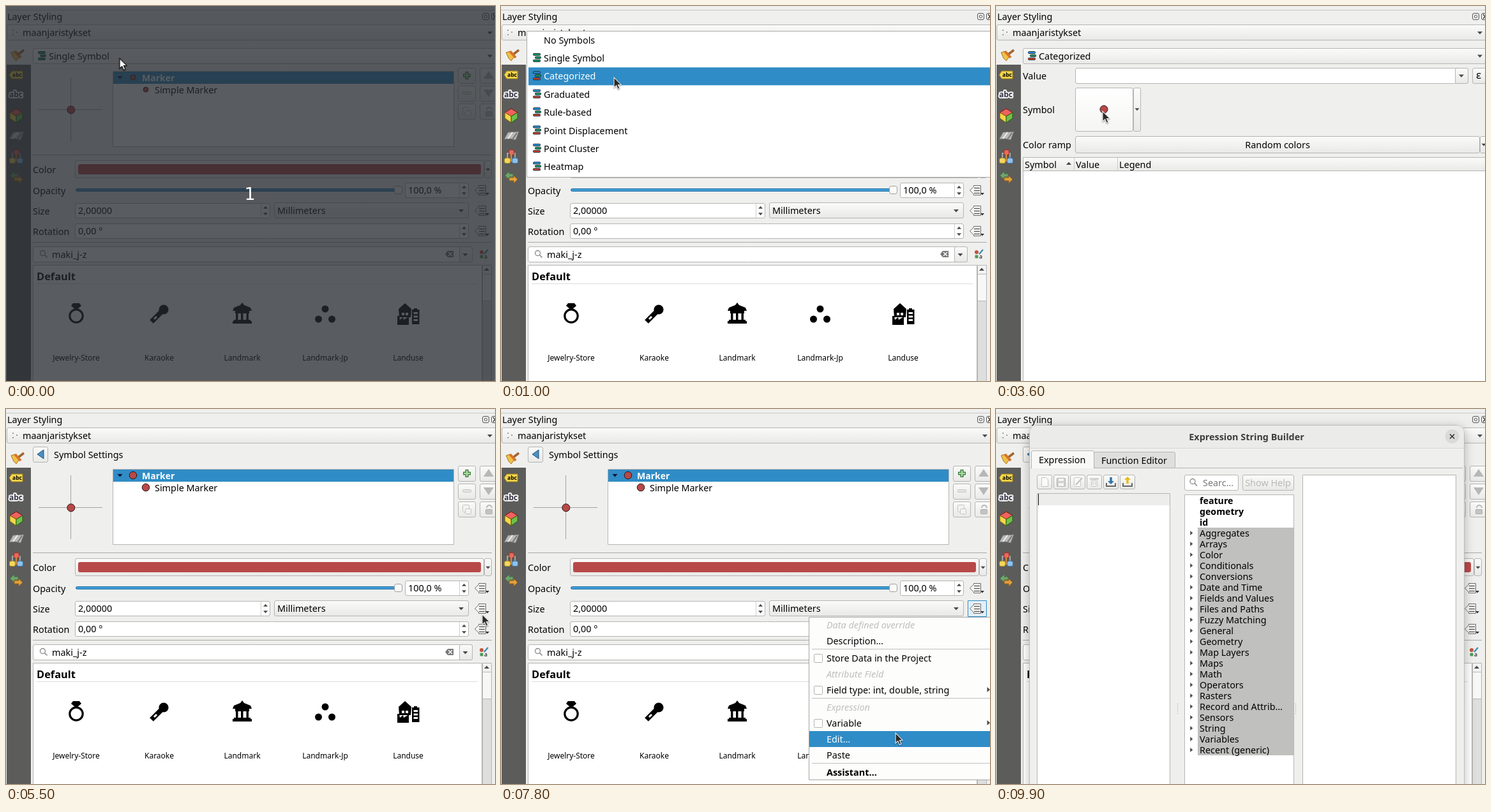
An HTML page with a canvas for the animation above (10 s loop, 766 by 588 pixels).

```html
<!DOCTYPE html>
<html lang="en">
<head>
<meta charset="utf-8">
<title>Layer Styling</title>
<style>
html, body { margin: 0; width: 100%; height: 100%; overflow: hidden; background: #efefee }
canvas { display: block }
</style>
</head>
<body>
<canvas id="stage" width="766" height="588"></canvas>
<script>
const c = document.getElementById('stage').getContext('2d');
const LOOP = 10000;
const BLUE = '#308cc6', RED = '#b84848', EDGE = '#b5b5b4', BG = '#efefee', INK = '#4a4a4a';
const SANS = '"Noto Sans", "Open Sans", sans-serif';

// ---- drawing helpers ----
function rect(x, y, w, h, fill) { c.fillStyle = fill; c.fillRect(x, y, w, h); }

function box(x, y, w, h, fill = '#fff', stroke = EDGE, r = 2.5) {
  c.beginPath();
  c.roundRect(x + .5, y + .5, w, h, r);
  c.fillStyle = fill; c.fill();
  if (stroke) { c.strokeStyle = stroke; c.lineWidth = 1; c.stroke(); }
}

function button(x, y, w, h, lit = false, r = 2.5) {
  const g = c.createLinearGradient(0, y, 0, y + h);
  g.addColorStop(0, lit ? '#fff' : '#fbfbfa');
  g.addColorStop(1, lit ? '#f5f5f4' : '#e9e9e8');
  box(x, y, w, h, g, EDGE, r);
}

function poly(pts, fill, stroke, width = 1, close = true) {
  c.beginPath();
  for (let i = 0; i < pts.length; i += 2) c.lineTo(pts[i], pts[i + 1]);
  if (close) c.closePath();
  if (fill) { c.fillStyle = fill; c.fill(); }
  if (stroke) { c.strokeStyle = stroke; c.lineWidth = width; c.stroke(); }
}
const line = (pts, color, width = 1) => poly(pts, null, color, width, false);

function circle(x, y, r, fill, stroke, width = 1) {
  c.beginPath();
  c.arc(x, y, r, 0, 7);
  if (fill) { c.fillStyle = fill; c.fill(); }
  if (stroke) { c.strokeStyle = stroke; c.lineWidth = width; c.stroke(); }
}

function text(s, x, y, { size = 14.4, style = '', color = '#000', align = 'left', font = SANS } = {}) {
  c.font = `${style} ${size}px ${font}`;
  c.textAlign = align;
  c.fillStyle = color;
  c.fillText(s, x, y);
}

const down = (x, y, s = 4, color = INK) => poly([x - s, y - s / 2, x + s, y - s / 2, x, y + s / 2 + .5], color);
const up = (x, y, s = 4, color = INK) => poly([x - s, y + s / 2, x + s, y + s / 2, x, y - s / 2 - .5], color);
const right = (x, y, s = 4, color = INK) => poly([x - s / 2, y - s, x - s / 2, y + s, x + s / 2 + .5, y], color);
const marker = (x, y, r) => circle(x, y, r, RED, '#2a1515');

function magnifier(x, y) {
  circle(x - 1, y - 1, 4, null, '#888', 1.3);
  line([x + 2, y + 2, x + 6, y + 6], '#888', 1.6);
}

function bars(x, y, colors) {
  colors.forEach((color, i) => box(x + (i === 1 ? 3 : 0), y + i * 5, i === 1 ? 9 : 11, 3, color, '#123', 1));
}

// ---- window frame and sidebar ----
function frame() {
  rect(0, 0, 766, 588, BG);
  rect(0, 6, 766, 1, '#c9c9c8');
  text('Layer Styling', 2, 22);
  box(746, 11, 10, 10, BG, '#555');
  box(749, 14, 4, 4, BG, '#555', 1);
  box(760, 11, 10, 10, BG, '#555');
  line([763, 13, 769, 20], '#333', 1.3);
  line([763, 20, 769, 13], '#333', 1.3);
  button(1, 29, 772, 24);
  for (const [x, y] of [[11, 38], [17, 41], [11, 45]]) circle(x, y, 1.1, '#888');
  text('maanjaristykset', 26, 47);
  down(758, 42);
  sidebar();
}

function sidebar() {
  rect(1, 92, 38, 496, '#5c5c5b');
  line([19, 76, 28, 69], '#a3642d', 3.5);
  poly([8, 73, 14, 71, 21, 79, 16, 86, 12, 82], '#f0c04a', '#a87412');
  line([14, 71, 23, 81], '#d5732b', 4);

  poly([5, 108, 9, 102, 26, 102, 26, 114, 9, 114], '#f5d64d', '#a88a18');
  text('abc', 10, 111, { size: 8.5, style: 'bold' });
  c.lineJoin = 'round';
  c.font = 'bold 12px ' + SANS;
  c.textAlign = 'left';
  c.strokeStyle = '#f4f4f4'; c.lineWidth = 4;
  c.strokeText('abc', 5, 143);
  text('abc', 5, 143, { size: 12, style: 'bold', color: '#334' });
  c.lineJoin = 'miter';

  poly([16, 161, 26, 167, 16, 173, 6, 167], '#f0625d', '#7a1512');
  poly([6, 167, 16, 173, 16, 183, 6, 176], '#f4d64a', '#75640c');
  poly([26, 167, 16, 173, 16, 183, 26, 176], '#6fc04a', '#2a5c12');

  poly([5, 209, 11, 198, 28, 197, 23, 210, 14, 208], '#b9b9b8', '#777');
  line([11, 208, 18, 198], '#eee', 2);
  line([18, 209, 25, 199], '#777', 2);

  line([10, 240, 10, 231, 22, 231, 22, 240], '#bbb', 1.5);
  box(12, 225, 8, 8, '#e26a5d', '#a82c22');
  box(5, 238, 9, 8, '#f3d760', '#b3921c');
  box(17, 238, 9, 8, '#8fc1ea', '#3f7cb0');
  line([16, 232, 16, 244], '#d98a3a', 2);

  poly([6, 266, 13, 259, 13, 263, 19, 263, 19, 268, 13, 268, 13, 272], '#6fa56c', '#456f45');
  poly([26, 272, 20, 266, 20, 269, 13, 269, 13, 274, 20, 274, 20, 278], '#e2a03e', '#96601a');
}

function rendererCombo(label, colors, lit) {
  button(42, 66, 730, 24, lit);
  bars(50, 71, colors);
  text(label, 67, 84);
  down(758, 78.5);
}
const GREEN = '#1ba35c';
const GREENS = [GREEN, GREEN, GREEN], MIXED = ['#2d9be0', GREEN, '#d8452f'];

// ---- symbol panel ----
function overrideIcon(y) {
  poly([734.5, y, 740.5, y - 6, 740.5, y - 7.5, 751.5, y - 7.5, 751.5, y + 7.5, 740.5, y + 7.5, 740.5, y + 6], '#f5f5f4', '#6a6a6a');
  for (const d of [-3.5, .5, 4.5]) line([741, y + d, 750, y + d], '#555', 1.3);
  down(754, y + 5.5, 3, '#333');
}

function spin(x, y, w, value) {
  box(x, y, w, 23);
  line([x + w - 13.5, y + 1, x + w - 13.5, y + 23], '#cfcfce');
  text(value, x + 5, y + 17);
  up(x + w - 6.5, y + 7, 3.5);
  down(x + w - 6.5, y + 17, 3.5);
}

function layerButtons() {
  for (let row = 0; row < 3; row++)
    for (const x of [708, 742]) button(x, 97 + row * 28, 27, 24);
  line([722, 103, 722, 115], '#2b6e2b', 5);
  line([716, 109, 728, 109], '#2b6e2b', 5);
  line([722, 104, 722, 114], '#a9dba0', 2.6);
  line([717, 109, 727, 109], '#a9dba0', 2.6);
  box(715, 134, 13, 4, '#e5e5e4', '#c4c4c3', 1);
  box(715, 158, 10, 11, '#f3f3f2', '#c4c4c3', 1);
  box(719, 164, 9, 8, '#f3f3f2', '#c4c4c3', 1);
  poly([756, 102, 764, 114, 748, 114], '#b7b7b6');
  poly([756, 143, 764, 131, 748, 131], '#b7b7b6');
  box(751, 165, 10, 7, '#c3c3c2', '#acacab', 1);
  c.beginPath(); c.arc(757, 163, 4, Math.PI, 0);
  c.strokeStyle = '#b7b7b6'; c.lineWidth = 2; c.stroke();
}

function symbolIcons() {
  const K = '#000', W = '#fff';
  poly([105, 466, 115, 466, 118, 470, 110, 477, 102, 470], K);
  circle(110, 486, 10.2, null, K, 3.2);

  circle(247, 476, 7.6, K);
  line([243, 480, 228, 495], K, 8);
  line([236, 487, 232, 491], W, 3);

  poly([370, 465, 373, 469, 383, 473, 385, 478, 355, 478, 357, 473, 367, 469], K);
  rect(359, 478, 22, 4, K);
  for (const x of [360, 368, 376.5]) rect(x, 481, 3.5, 13, K);
  rect(357, 492, 26, 2, K);
  rect(355, 494, 30, 4, K);

  for (const [x, y] of [[500, 475], [489.5, 491], [510.5, 491]]) circle(x, y, 5.5, K);

  poly([625, 466, 635, 475, 634, 488, 616, 488, 615, 475], K);
  rect(620, 481, 4, 4, W);
  rect(626, 481, 4, 4, W);
  poly([613, 500, 613, 486, 616, 486, 617, 492, 622, 488, 623, 492, 631, 487, 631, 500], K);
  rect(636, 476, 11.5, 23, K);
  rect(639, 474, 5, 3, K);
  for (const y of [480, 485.5, 491]) rect(638.5, y, 6.5, 3, W);
}

function symbolPanel(dy, r, pressed) {
  c.save();
  c.translate(0, dy);
  line([51, 162.5, 151, 162.5], '#a3a3a2');
  line([101.5, 112, 101.5, 212], '#a3a3a2');
  marker(101.8, 162.8, 6);

  box(167, 102, 534, 118, '#fff', EDGE, 0);
  rect(168, 103, 533, 19, BLUE);
  down(178.5, 112, 4, '#113');
  marker(199, 112, r);
  text('Marker', 213, 118, { size: 14, style: 'bold', color: '#fff' });
  marker(219, 131, r);
  text('Simple Marker', 233, 137);
  layerButtons();
  rect(42, 233, 719, 1, '#a9a9a8');

  text('Color', 42, 262);
  button(108, 242, 640, 27);
  box(112.5, 247.5, 631, 16, RED, null, 3);
  button(749, 242, 11, 27);
  down(755, 256.5, 3.5);

  text('Opacity', 42, 295);
  box(109, 286, 502, 4, '#3f9cd6', '#2572a4', 2);
  box(608, 282, 12, 12, '#fbfbfa', '#9a9a99', 3);
  spin(625, 277, 99, '100,0 %');
  overrideIcon(289);

  text('Size', 42, 327);
  spin(108, 309, 305, '2,00000');
  button(420, 308, 304, 24);
  text('Millimeters', 425, 326);
  down(713, 321);
  if (pressed) box(731, 308, 29, 25, '#e3eef6', BLUE, 0);
  overrideIcon(321);

  text('Rotation', 42, 359);
  spin(108, 341, 616, '0,00 °');
  overrideIcon(353);
  rect(42, 370, 719, 1, '#a9a9a8');

  box(42, 377, 688, 24);
  magnifier(58.5, 388.5);
  text('maki_j-z', 72, 395);
  poly([688, 389, 692, 384, 701, 384, 701, 394, 692, 394], '#777');
  line([693, 386, 699, 392], '#fff', 1.4);
  line([693, 392, 699, 386], '#fff', 1.4);
  button(710, 377, 20, 24);
  down(719.5, 390);
  circle(745, 386, 3, '#c0563f');
  line([749, 389, 755, 382], '#3f8fb5', 2.4);
  box(742, 390, 5, 5, '#4d9b58', null, 1);
  text('a', 749, 396, { size: 9 });

  box(42, 406, 703, 210, '#fff', EDGE, 0);
  box(746, 406, 14, 210, '#dededd', EDGE, 0);
  box(746, 406, 14, 14, '#f3f3f2', EDGE, 0);
  up(753, 413);
  box(746, 420, 14, 42, '#f7f7f6', EDGE, 0);
  text('Default', 48, 430, { size: 16.4, style: 'bold' });
  rect(48, 435, 691, 1, '#dcdcdb');
  symbolIcons();
  ['Jewelry-Store', 'Karaoke', 'Landmark', 'Landmark-Jp', 'Landuse'].forEach((name, i) =>
    text(name, 110 + i * 130, 556, { size: 12, align: 'center' }));
  c.restore();
}

function settingsHeader() {
  button(42, 59, 23, 24);
  poly([49, 71, 59, 64, 59, 78], '#4a90c4', '#1f527c');
  text('Symbol Settings', 75, 77);
}

// ---- renderer list ----
function rendererPopup(selected) {
  const names = ['No Symbols', 'Single Symbol', 'Categorized', 'Graduated', 'Rule-based',
    'Point Displacement', 'Point Cluster', 'Heatmap'];
  box(40, 39, 740, 229, '#fff', '#a9a9a8', 0);
  names.forEach((name, i) => {
    const y = 39.5 + i * 28.4;
    if (i === selected) rect(43, y, 723, 28, BLUE);
    if (i) bars(50, y + 6, i === 1 ? GREENS : MIXED);
    text(name, 67, y + 19, { color: i === selected ? '#fff' : '#000' });
  });
}

// ---- categorized panel ----
function categorizedPanel(t) {
  text('Value', 42, 115);
  box(124, 97, 615, 24);
  button(719, 97, 20, 24);
  down(729, 109.5);
  button(746, 97, 30, 24);
  text('ε', 752, 114, { size: 17 });

  text('Symbol', 42, 168);
  if (t >= 3400 && t < 3600) box(124, 128, 90, 68, '#d9d9d8');
  else button(124, 128, 90, 68, t >= 2600);
  button(215, 128, 11, 68);
  down(221, 162, 3.5);
  marker(169, 162, 6);

  text('Color ramp', 42, 223);
  button(124, 204, 633, 26);
  text('Random colors', 441, 223, { align: 'center' });
  button(758, 204, 20, 26);
  down(764, 217.5, 3.5);

  box(42, 237, 740, 400, '#fff', EDGE, 0);
  button(42, 237, 740, 21, false, 0);
  for (const x of [122, 190]) rect(x, 238, 1, 21, '#c9c9c8');
  text('Symbol', 45, 254);
  up(114, 247);
  text('Value', 125, 254);
  text('Legend', 193, 254);
}

// ---- override menu ----
const MENU = [
  ['Data defined override', 339, 'head'], ['Description…', 364], ['Store Data in the Project', 391, 'check'],
  ['Attribute Field', 416, 'head'], ['Field type: int, double, string', 441, 'check sub'],
  ['Expression', 468, 'head'], ['Variable', 493, 'check sub'], ['Edit…', 518], ['Paste', 543], ['Assistant…', 570, 'bold']
];

function overrideMenu(pointerY) {
  box(482, 326, 300, 255, '#fdfdfc', '#a5a5a4', 0);
  for (const y of [376, 453, 555]) rect(487, y, 279, 1, '#c0c0bf');
  for (const [label, y, kind = ''] of MENU) {
    const head = kind === 'head', hot = !head && Math.abs(pointerY - y) <= 12.5;
    if (hot) rect(483, y - 13, 283, 25, BLUE);
    if (kind.includes('check')) box(490, y - 7, 13, 13, '#fff', '#b2b2b1', 1);
    if (kind.includes('sub')) right(763.5, y - 1, 4);
    text(label, 510, y + 5, {
      style: head ? 'italic' : kind === 'bold' ? 'bold' : '',
      color: head ? '#bebebd' : hot ? '#fff' : '#000'
    });
  }
}

// ---- expression dialog ----
const GROUPS = ['Aggregates', 'Arrays', 'Color', 'Conditionals', 'Conversions', 'Date and Time', 'Fields and Values',
  'Files and Paths', 'Fuzzy Matching', 'General', 'Geometry', 'Map Layers', 'Maps', 'Math', 'Operators', 'Rasters',
  'Record and Attrib…', 'Sensors', 'String', 'Variables', 'Recent (generic)'];

function toolIcons() {
  const pale = '#c6c6c5';
  for (let i = 0; i < 6; i++) button(64 + i * 26, 103, 23, 22);
  poly([71.5, 107.5, 78, 107.5, 81.5, 111, 81.5, 121.5, 71.5, 121.5], '#fafaf9', pale);
  box(95, 108, 13, 13, '#d0d0cf', '#b0b0af', 1);
  rect(98, 109, 8, 4, '#f4f4f3');
  rect(98, 116, 8, 5, '#f4f4f3');
  box(122, 107, 10, 14, '#fafaf9', pale, 1);
  line([125, 119, 135, 108], pale, 2.5);
  box(149, 111, 9, 10, '#f1f1f0', pale, 1);
  line([147, 109.5, 161, 109.5], pale, 2);
  for (const x of [152, 156]) line([x, 113, x, 119], pale);
  for (const [x, color, dir] of [[180, '#2f74a8', 1], [206, '#e5bd1c', -1]]) {
    line([x - 7, 116, x - 7, 121, x + 7, 121, x + 7, 116], '#666', 2);
    line([x, 112 - dir * 5, x, 112 + dir * 2], color, 3.5);
    poly([x - 5, 112 + dir, x + 5, 112 + dir, x, 112 + dir * 6], color);
  }
}

function dialog(active, caret) {
  c.save();
  c.shadowColor = active ? 'rgba(0,0,0,.38)' : 'rgba(0,0,0,.26)';
  c.shadowBlur = active ? 20 : 15;
  c.shadowOffsetY = 3;
  box(51.5, 24.5, 682, 640, BG, null, 12);
  c.restore();
  box(52, 25, 681, 640, BG, '#bdbdbc', 12);
  c.beginPath(); c.roundRect(53, 26, 680, 36, [11, 11, 0, 0]);
  c.fillStyle = '#ebebea'; c.fill();
  rect(53, 61, 680, 1, '#d6d6d5');
  text('Expression String Builder', 392.5, 49, { style: 'bold', color: '#3d3d3d', align: 'center' });
  circle(714.5, 43, 11, '#dadad9');
  line([711, 39.5, 718, 46.5], '#333', 1.6);
  line([711, 46.5, 718, 39.5], '#333', 1.6);

  rect(54, 92, 677, 1, EDGE);
  box(153, 67, 127, 25, '#dfdfde');
  box(55, 65, 98, 30, '#f8f8f7');
  rect(54, 93, 101, 4, BG);
  text('Expression', 67, 85);
  text('Function Editor', 165, 86);
  toolIcons();

  box(64, 132, 208, 500, '#fff', EDGE, 0);
  rect(66, 133, 206, 18, '#ededec');
  if (caret) rect(66, 133, 1, 18, '#000');

  box(295, 103, 84, 24);
  magnifier(309, 114.5);
  text('Searc…', 324, 121, { color: '#777' });
  button(386, 103, 80, 24);
  text('Show Help', 426, 121, { color: '#b9b9b8', align: 'center' });

  box(295, 134, 171, 500, '#fff', EDGE, 0);
  ['feature', 'geometry', 'id'].forEach((s, i) => text(s, 319, 149 + i * 17, { style: 'bold', size: 14.2 }));
  rect(316, 186, 150, 357, '#c0c0bf');
  GROUPS.forEach((s, i) => {
    right(306, 194.5 + i * 17, 3.5);
    text(s, 319, 200 + i * 17);
  });
  for (const x of [284, 469])
    for (let y = 462; y < 479; y += 3) rect(x, y, 1, 1, '#999');
  box(480, 103, 240, 500, '#fff', EDGE, 0);
}

// ---- pointer ----
const PATH = [[0, 178, 82], [900, 178, 82], [1000, 177, 112], [1100, 177, 112], [1400, 168, 98], [2300, 168, 98],
  [2400, 167, 118], [2600, 157, 157], [2800, 157, 157], [3000, 167, 165], [4600, 167, 165], [4900, 400, 320],
  [5200, 650, 366], [5500, 746, 322], [6900, 746, 322], [7200, 665, 450], [7400, 620, 535], [7500, 617, 509],
  [7700, 617, 509], [7800, 618, 508], [9100, 618, 508], [9500, 2, 6], [9600, -20, -25], [LOOP, -20, -25]];

function pointerAt(t) {
  const i = PATH.findIndex(key => key[0] > t);
  const [t0, x0, y0] = PATH[i - 1], [t1, x1, y1] = PATH[i];
  const k = (t - t0) / (t1 - t0);
  return [x0 + (x1 - x0) * k, y0 + (y1 - y0) * k];
}

function arrow(x, y, fill, stroke) {
  c.save();
  c.translate(x, y);
  c.shadowColor = 'rgba(0,0,0,.35)';
  c.shadowBlur = 2;
  c.shadowOffsetY = 1;
  poly([0, 0, 0, 16, 3.7, 12.6, 6.3, 18.5, 9, 17.3, 6.4, 11.6, 11, 11.2], fill, stroke, 1.1);
  c.restore();
}

function ibeam(x, y) {
  for (const [color, width] of [['#fff', 3], ['#222', 1]]) {
    line([x, y - 6, x, y + 6], color, width);
    for (const d of [-6.5, 6.5]) line([x - 2.5, y + d, x + 2.5, y + d], color, width);
  }
}

// ---- timeline ----
function draw(t) {
  const [x, y] = pointerAt(t);
  frame();
  if (t < 1700) {
    rendererCombo('Single Symbol', GREENS, true);
    symbolPanel(0, 3.9);
    if (t >= 400 && t < 1600) rendererPopup(t < 1000 ? 1 : 2);
  } else if (t < 3700) {
    rendererCombo('Categorized', MIXED, t < 1800);
    categorizedPanel(t);
  } else {
    settingsHeader();
    symbolPanel(-8, 5.8, t >= 5700 && t < 8000);
    if (t >= 5900 && t < 8000) overrideMenu(y);
    if (t >= 8400) dialog(t < 9900, Math.floor((t - 8400) / 500) % 2 === 1);
  }
  if (t < 100) {
    rect(0, 0, 766, 588, 'rgba(38,41,47,.76)');
    text('1', 382, 304, { size: 27, color: '#fff', align: 'center', font: '"DejaVu Sans", sans-serif' });
    arrow(x, y, '#fff', '#111');
  } else if (t >= 1800 && t < 2400) ibeam(168.5, 104.5);
  else arrow(x, y, '#2b2b2b', '#f4f4f4');
}

const start = performance.now();
function tick() {
  const t = (performance.now() - start) % LOOP;
  draw(Math.floor(t / 100) * 100);
  requestAnimationFrame(tick);
}
tick();
</script>
</body>
</html>
```
